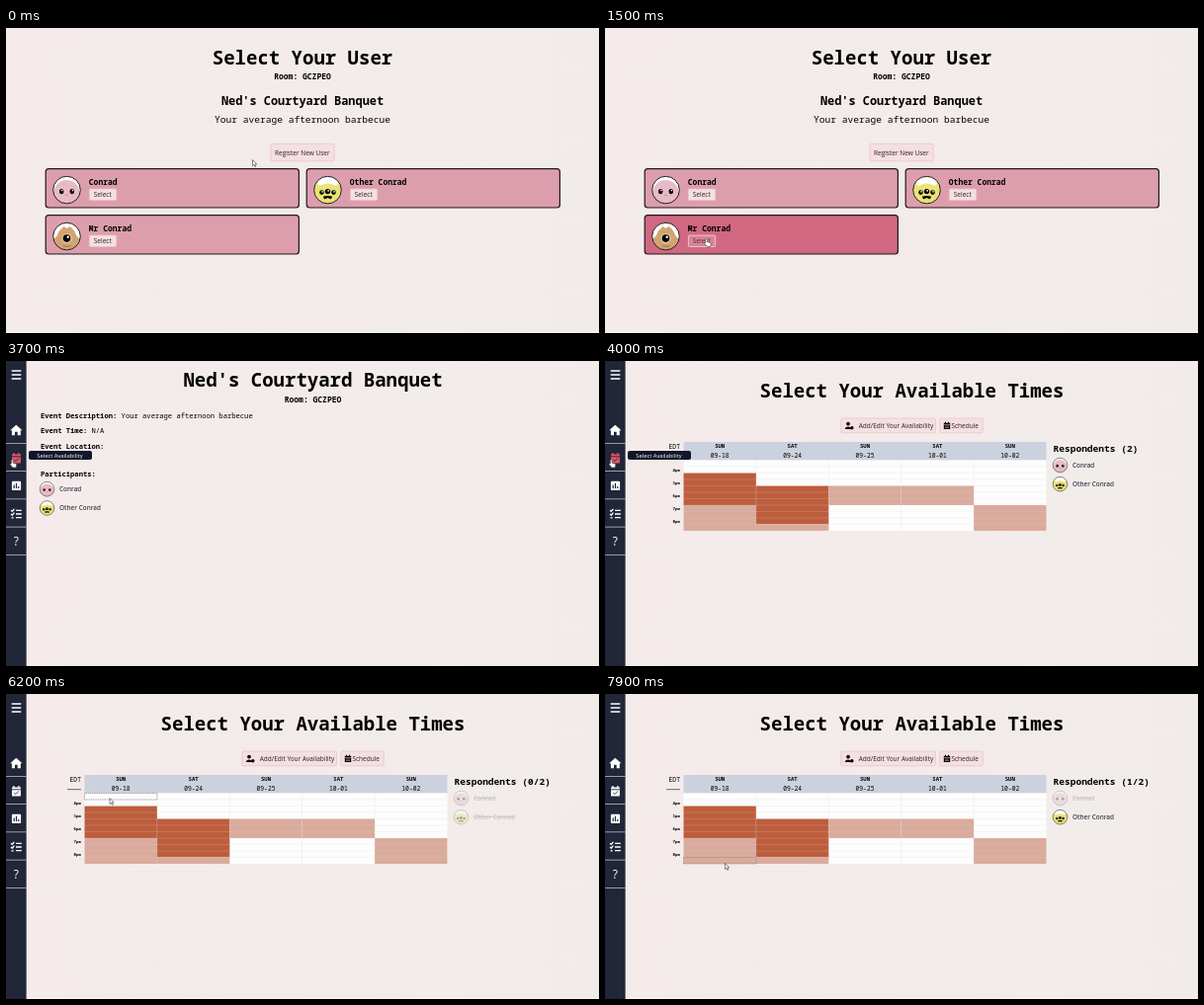
Animation of 600 by 309 pixels, one loop 8000 ms. Source, as an HTML page:

```html
<!DOCTYPE html>
<html lang="en">
<head>
<meta charset="utf-8">
<title>Event planner</title>
<style>
  html, body { margin: 0; width: 100%; height: 100%; overflow: hidden; background: #f2ecea; }
  svg { display: block; width: 600px; height: 309px; }
  text { font-family: "Noto Sans Mono", "DejaVu Sans Mono", monospace; white-space: pre; }
  .b { font-weight: 700; }
  .mid { text-anchor: middle; }
  .ui { font: 6.5px "Open Sans", "Noto Sans", sans-serif; fill: #2a2226; }
  .name { font-weight: 600; font-size: 6.4px; fill: #38404e; }
  .btn { fill: #f5dfe1; stroke: #ecc5ca; stroke-width: .8; }
  .card > .frame { fill: #dc9eac; stroke: #21171b; stroke-width: 1.2; }
  .card.hover > .frame { fill: #d06882; }
  .press .btn { fill: #d98497; stroke: #f3d5db; }
  .press .ui { fill: #5c2c39; }
  .off { opacity: .35; }
  .off text { text-decoration: line-through; fill: #777; }
  .icon { fill: #fff; }
  .icon.hover { fill: #e0566c; }
  .line { fill: none; stroke: #fff; stroke-width: 1.3; }
</style>
</head>
<body>
<svg viewBox="0 0 600 309">
  <defs>
    <linearGradient id="page">
      <stop stop-color="#f4ebea"/><stop offset="1" stop-color="#f1ecea"/>
    </linearGradient>
    <clipPath id="disc"><circle r="13.6"/></clipPath>
    <g id="pink">
      <circle r="13.8" fill="#fff"/>
      <path d="M-13 14V2C-11-14 11-14 13 2V14Z" fill="#e8bac7" clip-path="url(#disc)"/>
      <ellipse cx="-5.3" cy="1.5" rx="2.2" ry="2.7"/><ellipse cx="5.3" cy="1.5" rx="2.2" ry="2.7"/>
      <circle cx="-4.7" cy=".5" r=".8" fill="#fff"/><circle cx="5.9" cy=".5" r=".8" fill="#fff"/>
      <path d="M-1.5 5Q0 6 1.5 5" fill="none" stroke="#a87885" stroke-width=".7"/>
      <circle r="13.8" fill="none" stroke="#221b1e"/>
    </g>
    <g id="yellow">
      <circle r="13.8" fill="#fff"/>
      <path d="M-14 14V-3L-11-7Q-9-3-6-5Q0-8 6-5Q9-3 11-7L14-3V14Z" fill="#ebe375" clip-path="url(#disc)"/>
      <circle cx="-6" cy="2.5" r="2.3"/><circle cy="1.5" r="2.7"/><circle cx="6" cy="2.5" r="2.3"/>
      <circle cx="-5.5" cy="1.8" r=".8" fill="#fff"/><circle cx=".6" cy=".7" r=".9" fill="#fff"/><circle cx="6.5" cy="1.8" r=".8" fill="#fff"/>
      <path d="M-4.5 6.5Q0 5.5 4.5 6.5Q4 10 2 9L0 8L-2 9Q-4 10-4.5 6.5Z"/>
      <circle r="13.8" fill="none" stroke="#221b1e"/>
    </g>
    <g id="tan">
      <circle r="13.8" fill="#fff"/>
      <path d="M-14 14V3Q-9 0-8-5Q-5-8-3-10L0-8L3-10Q6-8 8-5Q9 0 14 3V14Z" fill="#d2a473" clip-path="url(#disc)"/>
      <circle cy="2" r="5.2" fill="#e6c69d"/><circle cy="2" r="3.8"/><circle cx="1.2" cy=".7" r="1.2" fill="#fff"/>
      <path d="M-4 9.5Q0 11 4 9.5" fill="none" stroke="#8c6540" stroke-width=".8"/>
      <circle r="13.8" fill="none" stroke="#221b1e"/>
    </g>
  </defs>

  <rect width="600" height="309" fill="url(#page)"/>
  <g id="pick"></g>
  <g id="event"></g>
  <g id="times"></g>
  <rect y="308" width="600" height="1" fill="#faf8f7"/>

  <g id="bar">
    <rect width="20.6" height="309" fill="#212638"/>
    <path d="M0 83.5H20.6M0 111.5H20.6M0 139.8H20.6M0 168.2H20.6M0 196.5H20.6" stroke="#b9bcc6" stroke-width=".8"/>
    <path class="line" d="M5.7 10H15.3M5.7 14H15.3M5.7 18H15.3"/>
    <path class="icon" d="M10.3 64.8L16.5 70.3H14.8V75.3H11.7V71.8H9V75.3H5.9V70.3H4.2Z"/>
    <g class="icon" id="cal">
      <path d="M6 94.5H7.3V93H8.6V94.5H12.2V93H13.5V94.5H14.9V103.5H6Z"/>
      <path d="M6 96.8H14.9M8.2 100L9.9 101.6L12.9 98.4" fill="none" stroke="#212638" stroke-width=".9"/>
    </g>
    <rect class="icon" x="5.9" y="121.8" width="9.2" height="9.2" rx="1"/>
    <path d="M8.2 129V125.5M10.5 129V123.8M12.8 129V127" stroke="#212638" stroke-width="1.2"/>
    <path class="line" d="M10 151.3H15.8M10 155H15.8M10 158.7H15.8M5 151.2L6.3 152.4L8.4 149.8M5 155L6.3 156.2L8.4 153.6M5.5 158.8H7.7"/>
    <text class="ui mid b" x="10.4" y="187.3" style="font-size:12px;fill:#fff">?</text>
    <g id="tip">
      <rect x="23" y="91" width="64" height="9" rx="2" fill="#10172a"/>
      <text class="ui mid" x="54.5" y="97.7" style="font-size:5.8px;fill:#fff">Select Availability</text>
    </g>
  </g>

  <g id="cursor" fill="#fff" stroke="#3a3a3a" stroke-width=".6" stroke-linejoin="round">
    <path id="arrow" d="M0 0V6L1.4 4.8L2.4 7L3.4 6.5L2.4 4.4H4.2Z"/>
    <path id="hand" d="M0 0C.9 0 1.1.5 1.1 1V3.2L4 4C4.6 4.2 4.8 4.6 4.7 5.2L4.2 8H.8L-1.7 5C-2.1 4.3-1.3 3.7-.7 4.2V1C-.7.4-.4 0 0 0Z"/>
  </g>
</svg>

<script>
const $ = id => document.getElementById(id);
const LOOP = 8000, STEP = 100;
const PEOPLE = ["Conrad", "Other Conrad", "Mr Conrad"];
const FACES = ["pink", "yellow", "tan"];
const EVENT = "Ned's Courtyard Banquet";
const ABOUT = "Your average afternoon barbecue";

// Cursor stops: time, x, y
const PATH = [
  [0, 249.5, 133.5], [100, 249.5, 133.5], [600, 168, 186], [900, 114, 234],
  [1200, 103, 215], [1500, 102.5, 213.5], [1800, 102.5, 213.5], [2200, 62.5, 137.5],
  [2800, 62.5, 138], [3400, 6, 100], [4000, 6, 100], [4200, 90, 135],
  [4500, 136, 245], [4700, 140.5, 264.5], [4800, 140.5, 264.5], [5200, 128, 178],
  [5500, 122, 150], [5800, 112, 125], [6000, 105, 105.5], [6300, 105, 105.5],
  [7900, 121.5, 171.5], [8000, 121.5, 171.5]
];
const CARDS = [[40.2, 142.7], [304.2, 142.7], [40.2, 189.7]];
const CARD_W = 256.2, CARD_H = 39.3;

// Grid: blocks are [column, first row, end row, who]; who is a bit per person
const GX = 79.5, GY = 100.5, CW = 73.4, RH = 6.5, ROWS = 11;
const DAYS = ["SUN 09-18", "SAT 09-24", "SUN 09-25", "SAT 10-01", "SUN 10-02"];
const BLOCKS = [[0, 2, 7, 3], [0, 7, 11, 2], [1, 4, 10, 3], [1, 10, 11, 2],
                [2, 4, 7, 1], [3, 4, 7, 1], [4, 7, 11, 2]];

const text = (x, y, size, str, cls = "") =>
  `<text x="${x}" y="${y}" font-size="${size}" class="${cls}">${str}</text>`;
const rect = (x, y, w, h, attrs) =>
  `<rect x="${x}" y="${y}" width="${w}" height="${h}" ${attrs}/>`;
const button = (x, y, w, h, label, lx, ly) =>
  `<g>${rect(x, y, w, h, 'class="btn" rx="1"')}${text(lx, ly, 6.5, label, "ui")}</g>`;
const face = (x, y, i, k) =>
  `<use href="#${FACES[i]}" transform="translate(${x} ${y}) scale(${k})"/>`;
const person = (x, y, i) =>
  `<g class="person">${face(x, y, i, .53)}${text(x + 12.5, y + 2.3, 6.4, PEOPLE[i], "ui name")}</g>`;

$("pick").innerHTML =
  text(300, 36.7, 19, "Select Your User", "b mid") +
  text(300, 52.2, 8, "Room: GCZPEO", "b mid") +
  text(300, 78.2, 11.9, EVENT, "b mid") +
  text(300, 95.8, 9.57, ABOUT, "mid") +
  button(267.8, 117.3, 64.4, 17.6, "Register New User", 272, 128.8) +
  CARDS.map(([x, y], i) => `<g class="card">
    ${rect(x, y, CARD_W, CARD_H, 'class="frame" rx="3"')}
    ${face(x + 21.3, y + 21.4, i, 1)}
    ${text(x + 43.6, y + 16.4, 8, PEOPLE[i], "b")}
    ${button(x + 44.2, y + 20.4, 27.2, 11.4, "Select", x + 48.6, y + 28.6)}</g>`).join("");

const fact = (y, label, value = "") =>
  text(35, y, 7.17, `<tspan class="b">${label}</tspan>${value}`);
$("event").innerHTML =
  text(310.5, 26.3, 19, EVENT, "b mid") +
  text(310.5, 42, 8, "Room: GCZPEO", "b mid") +
  fact(57.7, "Event Description:", " " + ABOUT) +
  fact(73, "Event Time:", " N/A") +
  fact(88.7, "Event Location:") +
  text(34.7, 101.3, 7.17, "+") +
  fact(116.6, "Participants:") +
  person(41.5, 129.8, 0) + person(41.5, 149, 1);

const gridLines = () => {
  let d = "";
  for (let c = 1; c < 5; c++) d += `M${GX + c * CW} ${GY}v${ROWS * RH}`;
  for (let r = 1; r < ROWS; r++) d += `M${GX} ${GY + r * RH}h${5 * CW}`;
  return `<path d="${d}" stroke="#d8d0ce" stroke-opacity=".35" stroke-width=".6"/>`;
};
$("times").innerHTML =
  text(310.5, 36.7, 19, "Select Your Available Times", "b mid") +
  button(238.8, 58, 95.6, 14.8, "Add/Edit Your Availability", 256.7, 67.8) +
  button(338.8, 58, 43.4, 14.8, "Schedule", 350.4, 67.8) +
  `<circle cx="246" cy="63.6" r="1.9"/><path d="M242.8 69C242.8 65.6 249 65.6 249 69Z"/>
   <circle cx="249.8" cy="67.8" r="1.7"/>
   <path d="M342.8 62.7H344V61.7H345V62.7H347V61.7H348V62.7H349.2V69H342.8Z"/>
   <path d="M342.8 64.5H349.2M344 66H348M344 67.6H348" stroke="#f5dfe1" stroke-width=".5"/>` +
  rect(GX, 82, 5 * CW, 18.5, 'fill="#cbd2dd"') +
  rect(GX, GY, 5 * CW, ROWS * RH, 'fill="#fdfdfd"') +
  BLOCKS.map(([c, a, b, who]) => rect(GX + c * CW, GY + a * RH, CW, (b - a) * RH,
    `fill="${who === 3 ? "#bd5d3d" : "#daab9c"}"`)).join("") +
  gridLines() +
  DAYS.map((day, i) => {
    const [name, date] = day.split(" "), x = GX + (i + .5) * CW;
    return text(x, 88.2, 5.6, name, "b mid") + text(x, 98, 6.3, date, "mid");
  }).join("") +
  text(64.6, 89, 6.3, "EDT") +
  '<path d="M62 96.7H76" stroke="#333" stroke-width=".7"/>' +
  [4, 5, 6, 7, 8].map((h, i) => text(68.5, 112 + i * 2 * RH, 4.1, h + "pm", "b")).join("") +
  rect(GX, GY, CW, RH, 'id="cell" fill="none" stroke="#777" stroke-width=".7" stroke-dasharray="1 .8"') +
  `<text id="count" class="b" x="453.5" y="92.2" font-size="9.55"></text>` +
  person(460.5, 105.5, 0) + person(460.5, 124.7, 1);

const cards = [...document.querySelectorAll(".card")];
const guests = [...$("times").querySelectorAll(".person")];
const show = (el, on) => { el.style.display = on ? "" : "none"; };
const inside = (x, y, left, top, w, h) =>
  x >= left && x < left + w && y >= top && y < top + h;

function cursorAt(t) {
  const i = PATH.findIndex(p => p[0] > t);
  const [t0, x0, y0] = PATH[i - 1], [t1, x1, y1] = PATH[i];
  const k = (t - t0) / (t1 - t0);
  return [x0 + (x1 - x0) * k, y0 + (y1 - y0) * k];
}

function hoverCards(x, y) {
  let pressed = false;
  cards.forEach((card, i) => {
    const [cx, cy] = CARDS[i];
    const onButton = inside(x, y, cx + 44, cy + 20, 28, 12);
    card.classList.toggle("hover", inside(x, y, cx, cy, CARD_W, CARD_H));
    card.lastElementChild.classList.toggle("press", onButton);
    pressed = pressed || onButton;
  });
  return pressed;
}

function hoverGrid(x, y) {
  const over = inside(x, y, GX, GY, 5 * CW, ROWS * RH);
  const col = Math.floor((x - GX) / CW), row = Math.floor((y - GY) / RH);
  const block = BLOCKS.find(([c, a, b]) => c === col && row >= a && row < b);
  const who = !over ? 3 : block ? block[3] : 0;
  const free = (who & 1) + (who >> 1);
  show($("cell"), over);
  $("cell").setAttribute("x", GX + col * CW);
  $("cell").setAttribute("y", GY + row * RH);
  $("count").textContent = `Respondents (${over ? free + "/2" : 2})`;
  guests.forEach((g, i) => g.classList.toggle("off", !(who >> i & 1)));
}

function draw(t) {
  const [x, y] = cursorAt(t);
  const scene = t < 1800 ? "pick" : t < 4000 ? "event" : "times";
  for (const id of ["pick", "event", "times"]) show($(id), id === scene);
  show($("bar"), scene !== "pick");

  const onCal = scene !== "pick" && inside(x, y, 0, 84, 20.6, 28);
  $("cal").classList.toggle("hover", onCal);
  show($("tip"), onCal);

  const pressed = hoverCards(x, y);
  hoverGrid(x, y);
  const pointing = scene === "event" || onCal || (scene === "pick" && pressed);
  show($("hand"), pointing);
  show($("arrow"), !pointing);
  $("cursor").setAttribute("transform", `translate(${x} ${y})`);
}

const start = performance.now();
function tick() {
  const t = (performance.now() - start) % LOOP;
  draw(Math.floor(t / STEP) * STEP);
  requestAnimationFrame(tick);
}
tick();
</script>
</body>
</html>
```
